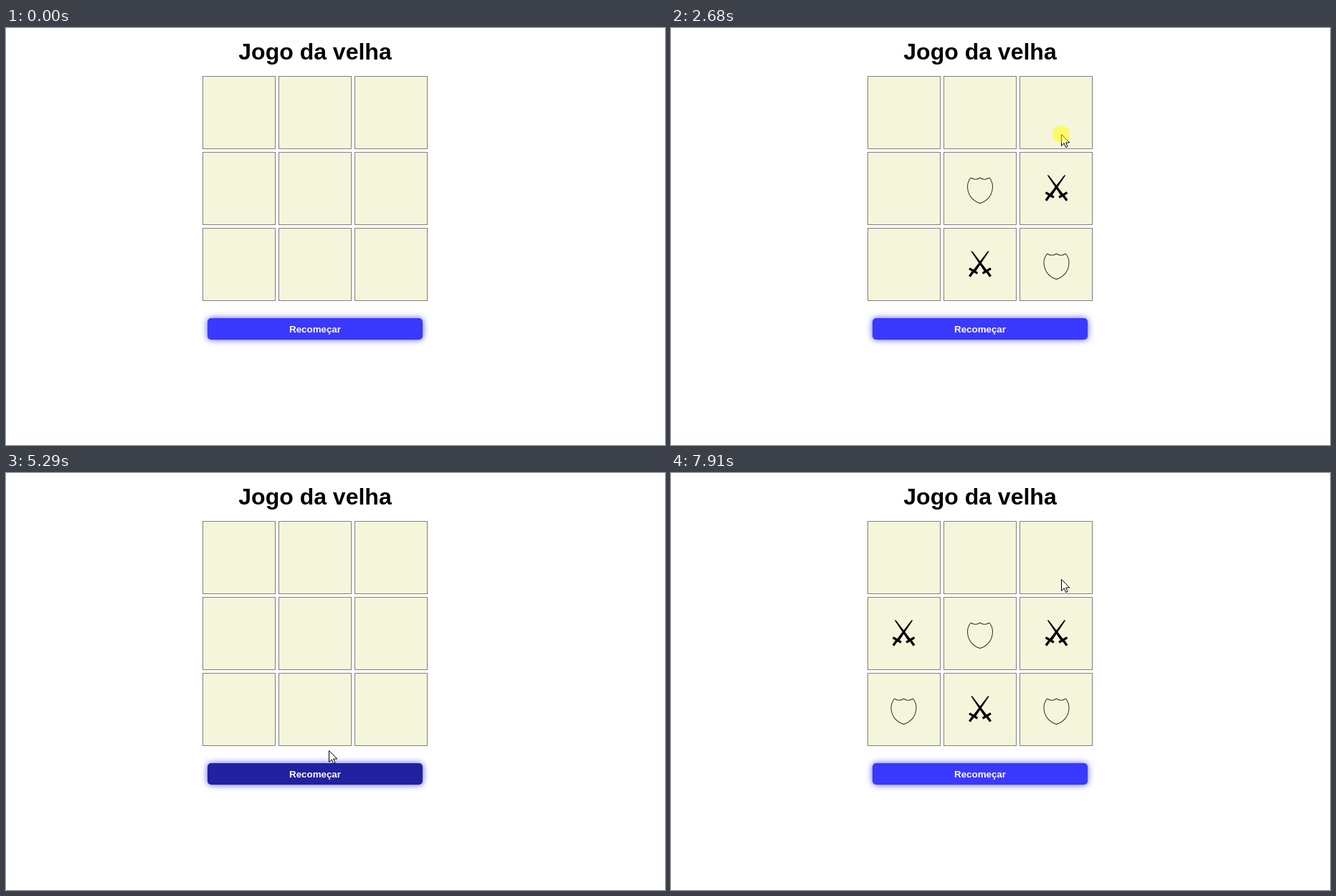
Recreate the animation shown at these times as an HTML page. Size 919 by 582 pixels, loop 8 s.

```html
<!DOCTYPE html>
<html lang="pt">
<head>
<meta charset="utf-8">
<title>Jogo da velha</title>
<style>
html, body { margin: 0; width: 100%; height: 100%; overflow: hidden; background: #fff; }
svg { display: block; width: 919px; height: 582px; }
text { font-family: "Liberation Sans", Arial, sans-serif; font-weight: bold; text-anchor: middle; }
</style>
</head>
<body>
<svg viewBox="0 0 919 582">
  <defs>
    <filter id="glow" x="-10%" y="-100%" width="120%" height="300%" color-interpolation-filters="sRGB">
      <feDropShadow dx="0" dy="0" stdDeviation="5" flood-color="#3939ff" flood-opacity=".85"/>
    </filter>
    <path id="shield" fill="none" stroke="#3c3c38" stroke-width="1.1" stroke-linejoin="round"
      d="M-13-15 Q-6-10.5 0-15 Q6-10.5 13-15 C16-11 17.5-7.5 17.5-3 C17.5 9 10.5 17.5 0 20.6 C-10.5 17.5-17.5 9-17.5-3 C-17.5-7.5-16-11-13-15Z"/>
    <g id="sword">
      <path d="M12.8-18.4 L10.8-18.6 L-10.6 9.2 L-7.2 11.6 Z"/>
      <path d="M-15 5.6 L-3.6 12.4 M-9 9 L-14.6 16.8" fill="none" stroke="#000" stroke-width="3.3"/>
    </g>
    <g id="swords"><use href="#sword"/><use href="#sword" transform="scale(-1 1)"/></g>
  </defs>
  <text x="431" y="44" font-size="32">Jogo da velha</text>
  <g id="board" fill="#f5f5dc" stroke="#808080"></g>
  <rect id="button" x="281" y="405" width="300" height="30" rx="5" filter="url(#glow)"/>
  <text x="431" y="425" font-size="13.333" fill="#fff">Recomeçar</text>
  <g id="marks"></g>
  <g id="cursor">
    <path transform="translate(.5 .5)" fill="#fff" stroke="#000"
      d="M0 0 V16 L3.7 12.4 L6.2 18 L8.6 17 L6.1 11.5 H11.3 Z"/>
    <circle id="halo" r="12" fill="#ff0" fill-opacity=".53"/>
  </g>
</svg>
<script>
const LOOP = 8000, STEP = 77, ENTER = 130;
const HOLD = 80, PAUSE = 110;
const HOVER = { from: 4140, to: 5360 };
const GRID = { x: 274.5, y: 67.5, pitch: 106, size: 101 };
const NS = "http://www.w3.org/2000/svg";
const byId = id => document.getElementById(id);

function add(parent, tag, attrs) {
  const node = document.createElementNS(NS, tag);
  for (const name in attrs) node.setAttribute(name, attrs[name]);
  return byId(parent).appendChild(node);
}

// A click presses the mouse at t; a pass only leads the pointer through
const click = (t, x, y) => ({ x, y, arrive: t - PAUSE, press: t, leave: t + HOLD });
const pass = (t, x, y) => ({ x, y, arrive: t, leave: t });

const route = [
  pass(ENTER, 760, 554),
  click(970, 566, 327),
  click(1370, 390, 338),
  click(1750, 421, 236),
  click(2200, 538, 246),
  click(2605, 544, 148),
  click(3050, 430, 136),
  pass(3820, 397, 332),
  pass(4060, 463, 398),
  pass(4600, 442, 417),
  click(4995, 442, 417),
  pass(5285, 450, 387),
  click(5560, 530, 338),
  click(6130, 433, 329),
  click(6430, 325, 332),
  click(6960, 325, 221),
  click(7250, 431, 232),
  click(7640, 537, 210),
  pass(7900, 544, 148)
];
const clicks = route.filter(stop => stop.press);

for (let i = 0; i < 9; i++) {
  add("board", "rect", {
    x: GRID.x + GRID.pitch * (i % 3), y: GRID.y + GRID.pitch * Math.floor(i / 3),
    width: GRID.size, height: GRID.size
  });
}

// Shields and swords alternate until a click below the board clears it
const marks = [];
let round = [];
for (const { x, y, leave } of clicks) {
  const col = Math.floor((x - GRID.x) / GRID.pitch);
  const row = Math.floor((y - GRID.y) / GRID.pitch);
  if (row > 2) {
    for (const mark of round) mark.to = leave;
    round = [];
    continue;
  }
  const node = add("marks", "use", {
    href: round.length % 2 ? "#swords" : "#shield",
    transform: `translate(${324.5 + 106.5 * col} ${118 + GRID.pitch * row})`
  });
  const mark = { node, from: leave, to: LOOP };
  round.push(mark);
  marks.push(mark);
}

const ease = p => p * p * (3 - 2 * p);

function cursorAt(t) {
  const next = route.findIndex(stop => stop.arrive > t);
  const b = route.at(next);
  const a = next > 0 ? route[next - 1] : b;
  const k = a === b ? 1 : ease(Math.max(0, (t - a.leave) / (b.arrive - a.leave)));
  return [a.x + (b.x - a.x) * k, a.y + (b.y - a.y) * k].map(Math.round);
}

const show = (node, on) => node.setAttribute("visibility", on ? "visible" : "hidden");
const during = (t, from, to) => t >= from && t < to;

function draw(t) {
  // The pointer is sampled at a fixed rate
  const tick = ENTER + STEP * Math.floor((t - ENTER + 5) / STEP);
  byId("cursor").setAttribute("transform", `translate(${cursorAt(Math.max(ENTER, tick))})`);
  byId("cursor").setAttribute("display", t < ENTER ? "none" : "inline");
  show(byId("halo"), clicks.some(({ press, leave }) => during(t, press, leave)));
  byId("button").setAttribute("fill", during(t, HOVER.from, HOVER.to) ? "#2121a1" : "#3939ff");
  for (const { node, from, to } of marks) show(node, during(t, from, to));
}

const origin = performance.now();
function frame() {
  draw((performance.now() - origin) % LOOP);
  requestAnimationFrame(frame);
}
draw(0);
requestAnimationFrame(frame);
</script>
</body>
</html>
```
